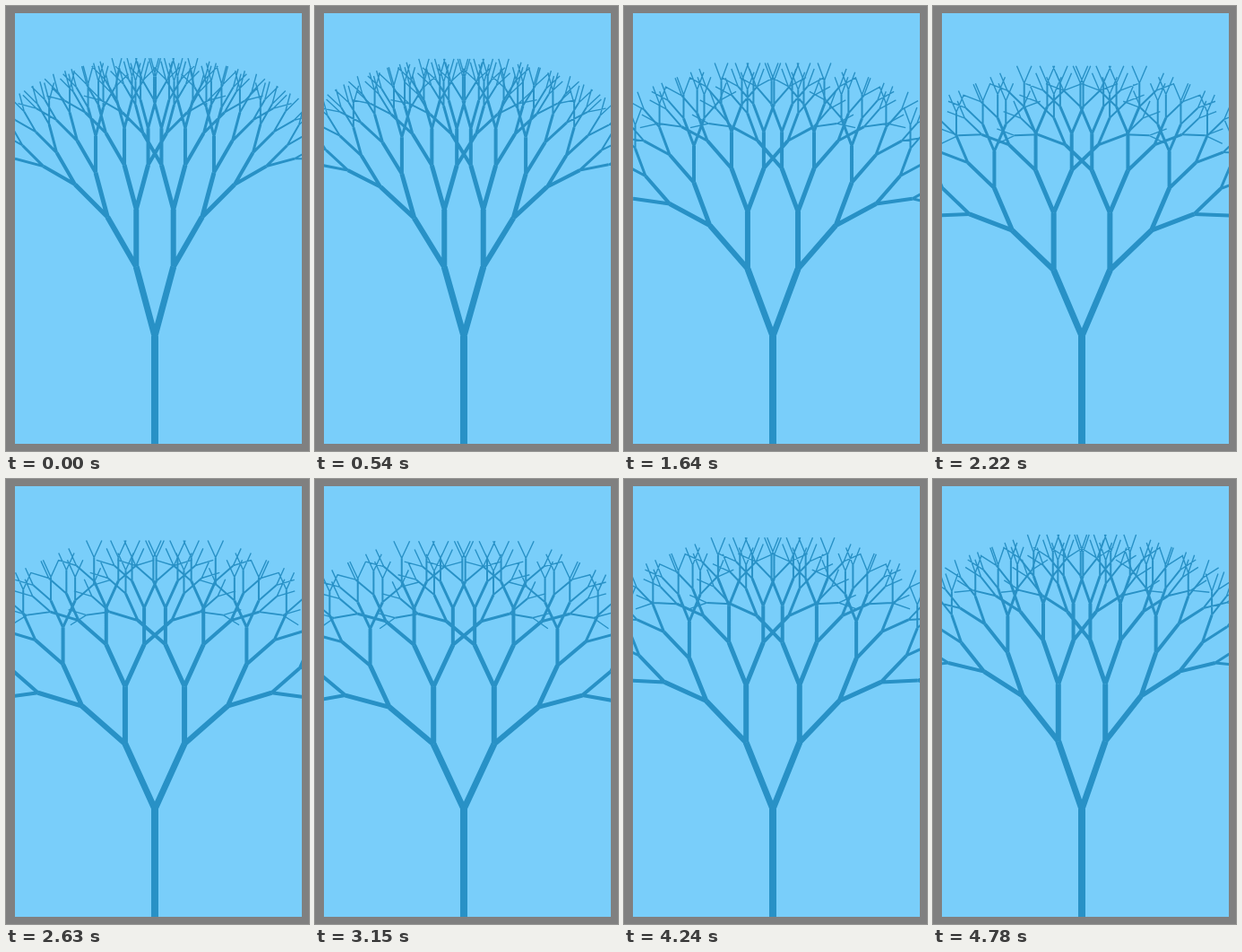
Write an HTML page that moves like this. It is 338 by 496 pixels and loops after 4850 ms.

```html
<!DOCTYPE html>
<html lang="en">
<head>
<meta charset="utf-8">
<title>Swaying tree</title>
<style>
html, body { margin: 0; width: 100%; height: 100%; overflow: hidden; background: #808080; }
svg { display: block; }
</style>
</head>
<body>
<svg width="338" height="496" viewBox="0 0 338 496">
  <defs><clipPath id="sky"><rect x="10" y="8" width="320" height="480"/></clipPath></defs>
  <rect x="10" y="8" width="320" height="480" fill="#79cefa"/>
  <g id="tree" clip-path="url(#sky)" fill="none" stroke="#2891c6"></g>
</svg>
<script>
const LOOP = 4850, STEP = 137, LEAD = 16;   // ms
const LEVELS = 8, RATIO = 0.8, TRUNK = 120, FIRST = 80;
const ROOT = { x: 166, y: 488 };
const rad = deg => deg * Math.PI / 180;

const tree = document.getElementById('tree');
const paths = Array.from({ length: LEVELS }, (_, level) => {
  const path = document.createElementNS('http://www.w3.org/2000/svg', 'path');
  path.setAttribute('stroke-width', Math.max(1.4, LEVELS - level));
  return tree.appendChild(path);
});

// Fork angle: swings between 15 and 25 degrees, 8 degrees of phase per step
function spread(step) {
  return rad(20 - 5 * Math.cos(rad(8 * step)));
}

function draw(fork) {
  const lines = paths.map(() => '');
  function branch(x, y, angle, length, level) {
    const x2 = x + length * Math.sin(angle);
    const y2 = y - length * Math.cos(angle);
    lines[level] += `M${x.toFixed(2)} ${y.toFixed(2)}L${x2.toFixed(2)} ${y2.toFixed(2)}`;
    if (level === LEVELS - 1) return;
    const next = level ? length * RATIO : FIRST;
    branch(x2, y2, angle - fork, next, level + 1);
    branch(x2, y2, angle + fork, next, level + 1);
  }
  branch(ROOT.x, ROOT.y, 0, TRUNK, 0);
  paths.forEach((path, i) => path.setAttribute('d', lines[i]));
}

let shown = -1;
function frame() {
  const step = Math.floor((performance.now() % LOOP + LEAD) / STEP);
  if (step !== shown) draw(spread(shown = step));
  requestAnimationFrame(frame);
}
frame();
</script>
</body>
</html>
```
